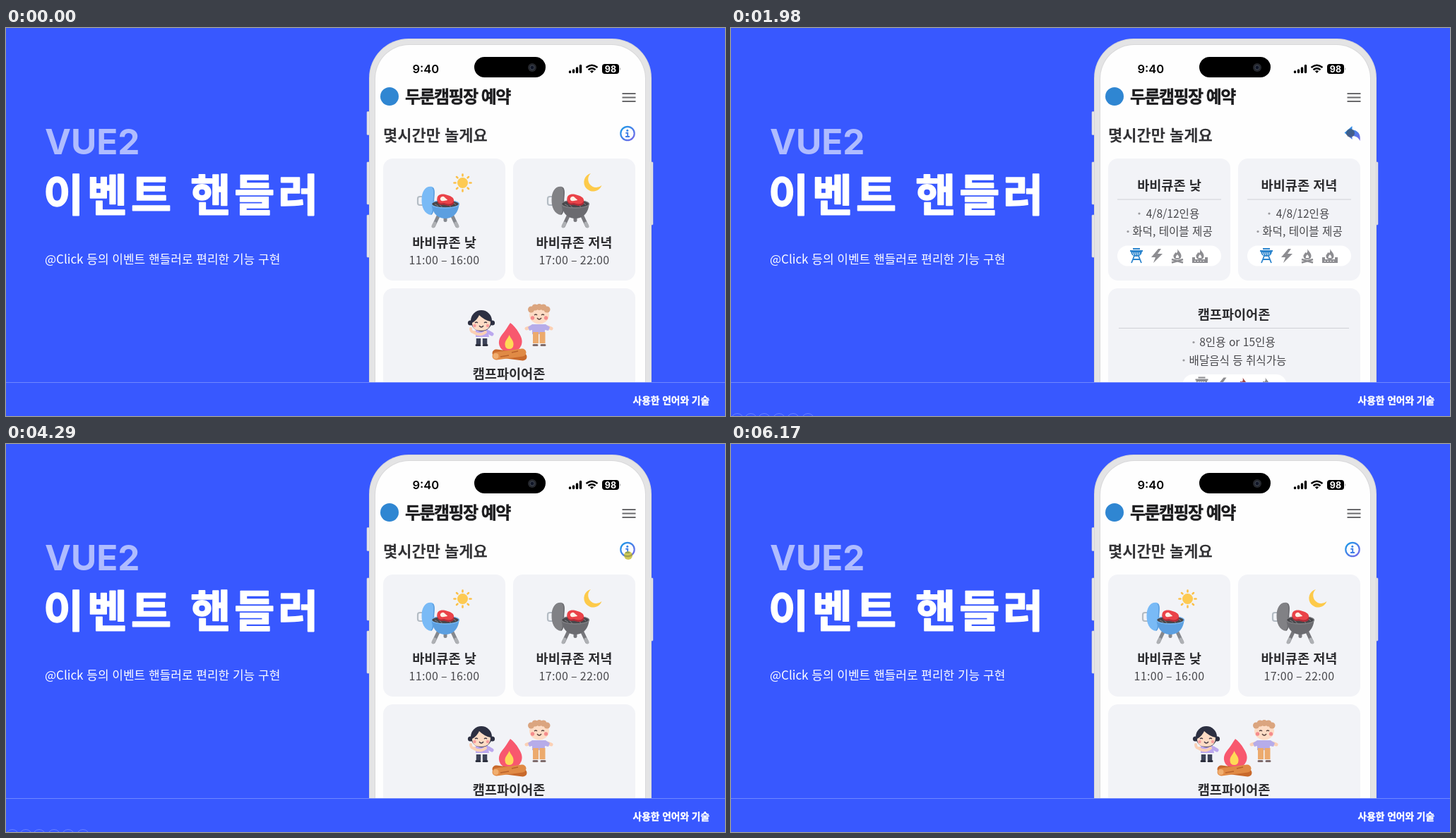
An HTML page that plays this animation: 1018x550 px, repeating every 6270 ms.

```html
<!DOCTYPE html>
<html lang="ko">
<head>
<meta charset="utf-8">
<style>
  html, body { margin: 0; width: 100%; height: 100%; overflow: hidden; background: #3858ff; }
  body { position: relative; }
  svg { position: absolute; left: 0; top: 0; display: block; }
  .card { position: absolute; height: 173px; border-radius: 14px; background: #f2f3f7; overflow: hidden; }
  text { font-family: "Noto Sans CJK KR", "Noto Sans CJK", "Noto Sans", sans-serif; }
  .latin { font-family: Inter, sans-serif; }
  .heavy { font-weight: 700; stroke: currentColor; stroke-linejoin: round; }
  .name { font-weight: 700; font-size: 18.6px; fill: #2d2d30; text-anchor: middle; }
  .info { font-weight: 300; font-size: 15.6px; fill: #48484c; text-anchor: middle; }
  .hours { font-size: 16px; letter-spacing: .02em; }
</style>
</head>
<body>
<svg id="base" width="1018" height="550">
  <defs>
    <linearGradient id="accent" x2="1" y2="1">
      <stop stop-color="#199be8"/><stop offset="1" stop-color="#7766e8"/>
    </linearGradient>
  </defs>
  <text class="latin" x="55" y="179" font-size="49.500" font-weight="700" fill="#afbcff">VUE2</text>
  <text class="heavy" x="53" y="260" font-size="62" letter-spacing=".08em" fill="#fff" color="#fff" stroke-width="1.6">이벤트 핸들러</text>
  <text x="55" y="333.5" font-size="17" fill="#fff">@Click 등의 이벤트 핸들러로 편리한 기능 구현</text>

  <g fill="#e6e6ea" stroke="#c9cad2" stroke-width=".6">
    <rect x="511" y="118.500" width="5" height="33" rx="1"/>
    <rect x="511" y="190" width="5" height="60" rx="1"/>
    <rect x="511" y="265" width="5" height="60" rx="1"/>
    <rect x="911" y="190" width="5" height="89" rx="1"/>
  </g>
  <rect x="514" y="15" width="400" height="600" rx="56" fill="#d5d5d8"/>
  <rect x="515" y="16" width="398" height="600" rx="55" fill="#e4e4e5"/>
  <rect x="522" y="23" width="384" height="600" rx="49" fill="#d8d8da"/>
  <rect x="523" y="24" width="382" height="600" rx="48" fill="#fefefe"/>

  <text class="latin" x="575.500" y="64" font-size="16.500" font-weight="600">9:40</text>
  <rect x="663" y="41" width="101" height="29" rx="14.500"/>
  <circle cx="745" cy="56" r="6" fill="#25272d"/>
  <circle cx="745" cy="56" r="3" fill="#101525" stroke="#3f4654"/>
  <g stroke="#000" stroke-width="3.400" stroke-linecap="round">
    <path d="M798.500 62.500v-.500M803.500 62.500v-2.500M808.500 62.500v-5.500M813.500 62.500v-9"/>
  </g>
  <g fill="none" stroke="#000" stroke-width="2.500">
    <path d="M821.500 56q8-6.500 16 0M824.500 59.300q5-4 10 0"/>
    <path d="M826.800 61l2.700 3 2.700-3q-2.700-1.500-5.400 0z" fill="#000" stroke="none"/>
  </g>
  <rect x="844" y="51" width="24" height="14" rx="4"/>
  <path d="M869.300 56q2 2 0 4z" fill="#999"/>
  <text class="latin" x="856" y="62.600" font-size="12.500" font-weight="700" fill="#fff" text-anchor="middle">98</text>

  <circle cx="543" cy="97" r="13" fill="#2f86d2"/>
  <text class="heavy" x="565" y="106" font-size="24" letter-spacing="-.065em" fill="#1b1b1d" color="#1b1b1d" stroke-width=".4">두룬캠핑장 예약</text>
  <path d="M872.500 93h19M872.500 98.500h19M872.500 104h19" stroke="#6a6a6c" stroke-width="2"/>
  <text x="534" y="160" font-size="22" font-weight="600" fill="#333336">몇시간만 놀게요</text>
  <g id="infoIcon">
    <circle cx="880" cy="149.500" r="9.700" fill="none" stroke="url(#accent)" stroke-width="2.200"/>
    <circle cx="879.800" cy="145.300" r="1.500" fill="#3784e6"/>
    <path d="M877.300 148.800h2.900v5.200M877 154h6" fill="none" stroke="#3f7fe6" stroke-width="1.900"/>
  </g>
  <path id="backIcon" fill="url(#accent)" d="M868.500 148.500L879.500 139v5.300C887 145 892 150 890.500 160C888 155 885 153 879.500 153v5z"/>
</svg>

<svg id="overlay" width="1018" height="550">
  <rect y="502" width="1018" height="48" fill="#3858ff"/>
  <path d="M0 502.500h1018" stroke="#6f87ff"/>
  <text class="heavy" x="996" y="532.500" font-size="13.700" text-anchor="end" fill="#fff" color="#fff" stroke-width=".4">사용한 언어와 기술</text>
  <g id="controls" fill="none" stroke="#fff" stroke-opacity=".24"></g>
  <circle id="cursor" r="6"/>
</svg>

<script>
const LOOP = 6270;
const $ = id => document.getElementById(id);
const label = (cls, x, y, s) => `<text class="${cls}" x="${x}" y="${y}">${s}</text>`;

function grill(lid, bowl, legs) {
  return `
    <path d="M590 238.500h-4q-3 0-3 3v6q0 3 3 3h4" fill="none" stroke="#b4bcc4" stroke-width="2.200"/>
    <path d="M603 224.500C594 223 588.500 231 588.500 243C588.500 254 592 261 599 264Q604 265 605 259L606.500 232Q606.500 225 603 224.500z" fill="${lid}"/>
    <path d="M604 226q2.500 2 2 9l-1.500 23q-.5 5-3 6" fill="none" stroke="${bowl}" stroke-width="1.600"/>
    <path d="M613 264l-7.500 16M631 264l7.500 16M622 266v6" stroke="${legs}" stroke-width="5" stroke-linecap="round"/>
    <path d="M607 276.500l-2 4M637 276.500l2 4" stroke="#aeb0b4" stroke-width="5" stroke-linecap="round"/>
    <path d="M602.500 250C604 263 612 269.500 622 269.500S640 263 641.500 250z" fill="${bowl}"/>
    <ellipse cx="622" cy="249" rx="19.500" ry="5.500" fill="#47474b" stroke="${lid}" stroke-width="1.500"/>
    <path d="M607 249l5 3M614 250l4 4M626 250l4 3M633 247l4 3" stroke="#88888c"/>
    <path d="M610.500 244C610 238 616 235 622 237C629 238 635 242 634.500 247C633 253 625 252 620 250C614 251 611 249 610.500 244z" fill="#b02c38"/>
    <path d="M610.500 242C610 236 616 234 622 235.500C629 237 635 240 634 244.500C632 250 625 249.500 620 247.500C614 249 611 247 610.500 242z" fill="#ea4349"/>
    <path d="M615 240.500q3-4 6-1t4 3.500-5 1.500-5-4z" fill="#fff1e6"/>`;
}

const sun = `<circle cx="646.500" cy="219" r="7.500" fill="#fdca52"/>` +
  Array.from({ length: 8 }, (_, i) =>
    `<path d="M646.500 207v2" stroke="#fbc04a" stroke-width="2.600" stroke-linecap="round" transform="rotate(${i * 45} 646.500 219)"/>`).join("");
const moon = `<path d="M644 205.500A13 13 0 1 0 659.500 222.500A11.500 11.500 0 0 1 644 205.500z" fill="#fdca4a"/>`;

const girl = `
  <path d="M664 431q-6 1-6-5" fill="none" stroke="#fbd0b5" stroke-width="4" stroke-linecap="round"/>
  <path d="M683 431l5 3" stroke="#bba8ee" stroke-width="5" stroke-linecap="round"/>
  <path d="M669 440v8M678 440v8" stroke="#3c4258" stroke-width="6.500"/>
  <path d="M666 449.500h5M676 449.500h5" stroke="#2b2e3c" stroke-width="3" stroke-linecap="round"/>
  <path d="M665 427h17l2 11h-19z" fill="#bba8ee"/>
  <path d="M663 432q9 5 16-1" fill="none" stroke="#fbd0b5" stroke-width="4" stroke-linecap="round"/>
  <circle cx="657.500" cy="418" r="3.600" fill="#2d3042"/><circle cx="688.500" cy="418" r="3.600" fill="#2d3042"/>
  <circle cx="673" cy="415" r="15" fill="#2d3042"/>
  <path d="M660 418Q667 414 670 407Q677 414 686 416C686 425 681 429 673 429S660 426 660 418z" fill="#fddcc5"/>
  <path d="M664 418q2-2 4 0M677 418q2-2 4 0M670 422q3 4 6 0" fill="none" stroke="#443942" stroke-width="1.300"/>
  <circle cx="663.500" cy="422" r="2.200" fill="#f79b9b"/><circle cx="682" cy="422" r="2.200" fill="#f79b9b"/>`;

const boy = `
  <path d="M743 424l-6 2M767 424l5 2" stroke="#fbd0b5" stroke-width="5" stroke-linecap="round"/>
  <path d="M745 420h19l6 4-2 5-5-1v6h-18v-6l-4 1-2-5z" fill="#b6ace9"/>
  <path d="M750 431v16M759.500 431v16" stroke="#ecaa6d" stroke-width="8"/>
  <path d="M747 449.500h5M758 449.500h5" stroke="#7e6a6a" stroke-width="3" stroke-linecap="round"/>
  <ellipse cx="755" cy="407" rx="14" ry="12.500" fill="#fddcc5"/>
  <g fill="#dba57f"><circle cx="743.500" cy="399" r="4.500"/><circle cx="749" cy="396" r="4.500"/><circle cx="755" cy="395.500" r="4.500"/><circle cx="761" cy="396" r="4.500"/><circle cx="766" cy="399" r="4.500"/></g>
  <path d="M748 407q2-2 4 0M758 407q2-2 4 0M752 411q3 4 6 0" fill="none" stroke="#5b4540" stroke-width="1.300"/>
  <circle cx="745.500" cy="411" r="2.700" fill="#f58c8c"/><circle cx="764.500" cy="411" r="2.700" fill="#f58c8c"/>`;

const campfire = `
  <path d="M714 418C718 421 723 426 726 432C730 438 732 444 729.500 450Q726 459 714 459Q701 459 698.500 450C696 441 702 435 706 430C709 426 711 422 714 418z" fill="#f8586e"/>
  <path d="M712.500 435C715 441 719 443 718.500 449Q718 455 712.500 455T706.500 449C706 443 711 440 712.500 435z" fill="#ffd957"/>
  <path d="M694 461l38 5" stroke="#c8692c" stroke-width="11" stroke-linecap="round"/>
  <path d="M694 465l37-5" stroke="#e08a45" stroke-width="11" stroke-linecap="round"/>
  <path d="M700 466l12-2M716 460l9-2" stroke="#b9612a" stroke-width="1.400"/>
  <circle cx="693.500" cy="465" r="4" fill="#f0ae70"/>`;

const flame = `<path d="M0-10C2-6 6-4 5.500 1Q5 5 0 5T-5.500 1C-6-2-3-3-3-5L-1-4Q1-6 0-10z"/><path d="M0-2Q3 1 2 3H-2Q-3 1 0-2z" fill="#fff"/>`;

// Row of four facility icons in a white pill centred near (x, y).
function facilities(x, y, grillColor, fireColor) {
  const gray = "#8d8d91";
  const at = (dx, color, art) =>
    `<g transform="translate(${x + dx} ${y})" fill="${color}" stroke="none">${art}</g>`;
  return `<rect x="${x - 74}" y="${y - 14.5}" width="147" height="29" rx="14.500" fill="#fff"/>` +
    at(-47, grillColor, `<path d="M-9-8H9V-6H8Q7 1 0 1T-8-6H-9z"/><path d="M-3 0L-7 10M3 0L7 10M-5 5H5M-5-10H5" fill="none" stroke="${grillColor}" stroke-width="1.800"/><path d="M-6-4H6M-5-2H5" stroke="#fff" stroke-dasharray="2 1"/>`) +
    at(-18, gray, `<path d="M2-10L-8 2H-2L-5 10L8-3H1L6-10z"/>`) +
    at(11, fireColor, `${flame}<path d="M-8 5L8 9.500M-8 9.500L8 5" stroke="${fireColor}" stroke-width="2.600"/>`) +
    at(43, gray, `${flame}<path d="M-11 2H-7V5H7V2H11V10H-11z"/><path d="M-8 7.500H8" stroke="#fff" stroke-dasharray="2 2"/>`);
}

function details(x, top, title, lines, halfLine) {
  const rows = lines.map(([s, dx, bullet], i) =>
    label("info", x + dx, top + 83.5 + i * 25.5, s) +
    `<circle cx="${x + bullet}" cy="${top + 78 + i * 25.5}" r="1.600" fill="#9a9a9e"/>`).join("");
  return label("name", x, top + 45, title) +
    `<path d="M${x - halfLine} ${top + 58}h${halfLine * 2}" stroke="#cfd1d6"/>` + rows;
}

function zone(title, hours, art) {
  return art + label("name", 620.5, 310, title) + label("info hours", 620.5, 334, hours);
}

function zoneBack(title) {
  return details(620.5, 184.5, title, [["4/8/12인용", 5, -42.5], ["화덕, 테이블 제공", 4.5, -58.5]], 73.5) +
    facilities(621, 322.5, "#2b84cd", "#8d8d91");
}

function makeCard(x, y, width, depth, viewX, front, back) {
  const card = document.createElement("div");
  card.className = "card";
  card.style.cssText = `left:${x}px;top:${y}px;width:${width}px;transform-origin:50% 0`;
  card.innerHTML = [front, back].map(art =>
    `<svg width="${width}" height="173" viewBox="${viewX} ${y} ${width} 173">${art}</svg>`).join("");
  document.body.insertBefore(card, $("overlay"));
  return { card, depth, faces: card.children };
}

const cards = [
  makeCard(534, 184.5, 173, "", 534,
    zone("바비큐존 낮", "11:00 – 16:00", grill("#79baf6", "#5c9fe0", "#85888e") + sun), zoneBack("바비큐존 낮")),
  makeCard(718, 184.5, 173, "", 534,
    zone("바비큐존 저녁", "17:00 – 22:00", grill("#818185", "#6b6b70", "#77777c") + moon), zoneBack("바비큐존 저녁")),
  makeCard(534, 369, 357, "perspective(1200px) ", 534,
    girl + boy + campfire + label("name", 712, 496.5, "캠프파이어존"),
    details(712, 367.5, "캠프파이어존", [["8인용 or 15인용", 5, -57], ["배달음식 등 취식가능", 5.5, -71]], 163) +
      facilities(713.5, 505.5, "#8d8d91", "#a24c4c")),
];

$("controls").innerHTML = [9, 28, 47, 68, 88, 109].map(x => `<circle cx="${x}" cy="555.500" r="9"/>`).join("");

const clicks = [1580, 3050, 4290, 5430];
const flips = [[1650, 1962], [3130, 3300], [4370, 4610], [5510, 5729]];
const cursorPath = [
  [890, 898, 179], [1170, 877, 149], [3740, 877, 149],
  [3840, 881, 158], [6070, 881, 158], [6170, 898, 229],
];
const clamp = v => Math.max(0, Math.min(1, v));
const smooth = u => u * u * (3 - 2 * u);
const show = (el, on) => { el.style.display = on ? "" : "none"; };

function drawCards(t) {
  const angle = 180 * flips.reduce((sum, [from, to], i) =>
    sum + (i % 2 ? -1 : 1) * smooth(clamp((t - from) / (to - from))), 0);
  const turned = angle > 90;
  for (const { card, depth, faces } of cards) {
    card.style.transform = angle % 180 ? `${depth}rotateY(${turned ? angle - 180 : angle}deg)` : "none";
    show(faces[0], !turned);
    show(faces[1], turned);
  }
  const arrow = flips.filter(([from]) => t >= from).length % 2 === 1;
  show($("infoIcon"), !arrow);
  show($("backIcon"), arrow);
}

function drawCursor(t) {
  const cursor = $("cursor");
  const next = cursorPath.findIndex(([time]) => time > t);
  show(cursor, next > 0);
  if (next < 1) return;
  const [t0, x0, y0] = cursorPath[next - 1], [t1, x1, y1] = cursorPath[next];
  const u = (t - t0) / (t1 - t0);
  cursor.setAttribute("cx", x0 + (x1 - x0) * u);
  cursor.setAttribute("cy", y0 + (y1 - y0) * u);
  const pressed = clicks.some(c => t >= c && t < c + 100);
  cursor.setAttribute("fill", pressed ? "rgba(190,180,15,.7)" : "rgba(65,65,70,.56)");
}

function frame(now) {
  const t = now % LOOP;
  drawCards(t);
  drawCursor(t);
  show($("controls"), t >= 1680 && t < 4600);
  requestAnimationFrame(frame);
}
frame(performance.now());
</script>
</body>
</html>
```
